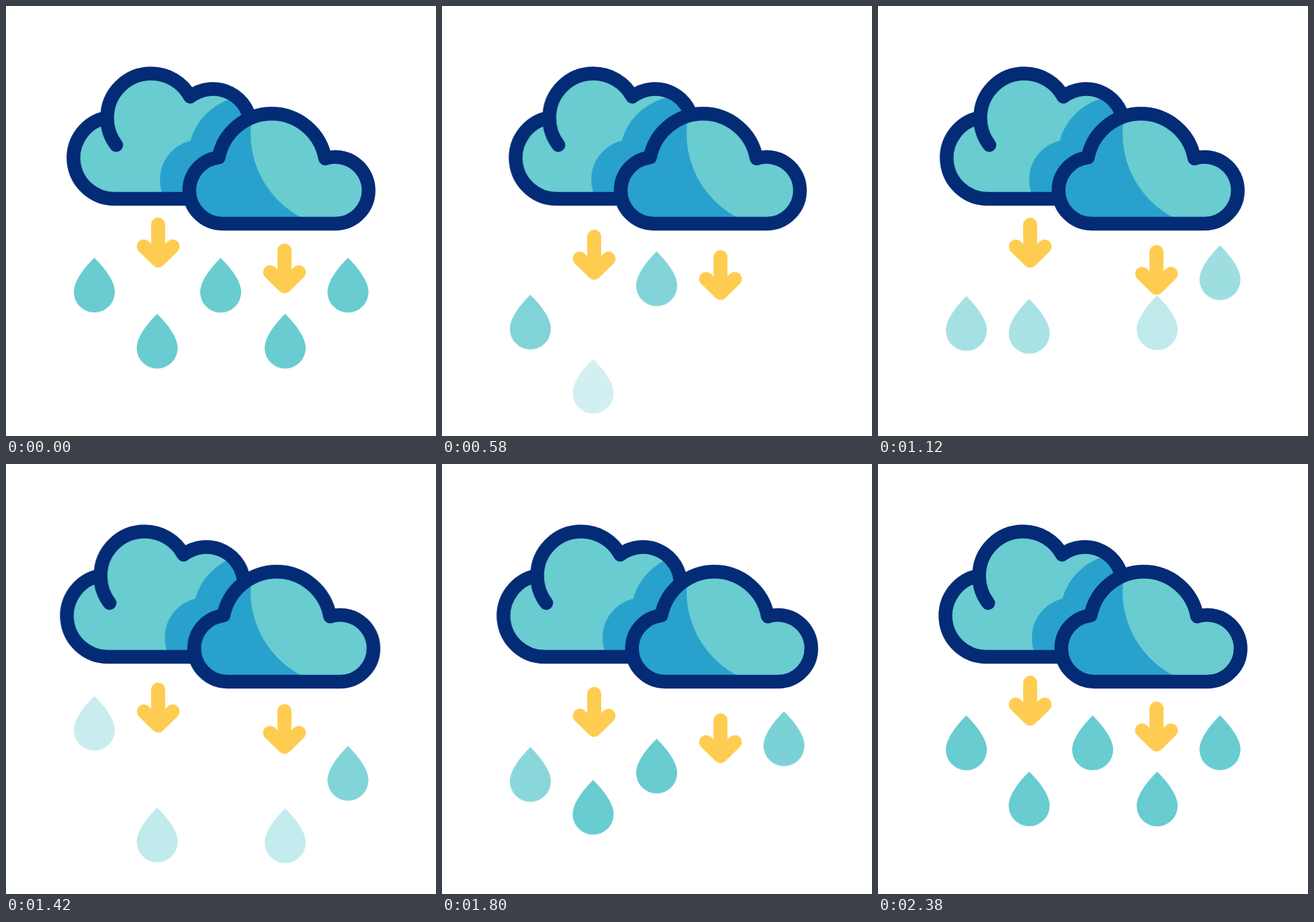
Write an HTML page that moves like this. It is 640x640 px and loops after 2400 ms.

```html
<!DOCTYPE html>
<html lang="en">
<head>
<meta charset="utf-8">
<title>Rain clouds</title>
<style>
  html, body { margin: 0; width: 100%; height: 100%; overflow: hidden; background: #fff; }
  svg { display: block; width: 100%; height: 100%; }

  .back, .unback, .front, .arrow {
    animation: 2400ms cubic-bezier(.3333, 0, .6667, 1) infinite;
  }
  .back { --k: 1px; animation-name: back; }
  .unback { --k: -1px; animation-name: back; }
  .front { animation-name: front; }
  .a1 { animation-name: bob1; }
  .a2 { animation-name: bob2; }

  @keyframes back {
    0%, 96.25%, 100% { transform: translateX(0); }
    32.5% { transform: translateX(calc(11 * var(--k))); }
    65% { transform: translateX(calc(-11.7 * var(--k))); }
  }
  @keyframes front {
    0%, 99.17%, 100% { transform: translateX(0); }
    36.25% { transform: translateX(-9.3px); }
    68.33% { transform: translateX(11.3px); }
  }
  @keyframes bob1 {
    0%, 46.25%, 100% { transform: translateY(0); }
    10% { transform: translateY(-17.8px); }
    24.6%, 70% { transform: translateY(18px); }
  }
  @keyframes bob2 {
    0%, 51.67%, 100% { transform: translateY(0); }
    13.75% { transform: translateY(-17.8px); }
    28.9%, 77.5% { transform: translateY(18px); }
  }

  .line { fill: none; stroke: #032b76; stroke-width: 20.4; stroke-linecap: round; stroke-linejoin: round; }
  .arrow { fill: none; stroke: #fecc50; stroke-width: 20.8; stroke-linecap: round; stroke-linejoin: round; }
  .teal { fill: #68ccd1; }
  .blue { fill: #28a1cd; }
  .shade { fill: #28a1cd; stroke: #28a1cd; stroke-width: 20.4; stroke-linejoin: round; }
</style>
</head>
<body>
<svg viewBox="0 0 640 640">
  <defs>
    <path id="drop" d="M0 0C-14 14-30.5 34-30.5 51A30.5 30.5 0 0 0 30.5 51C30.5 34 14 14 0 0Z"/>
    <path id="arrow" d="M226.5 325.5V378M205 358l21.5 21 21.5-21"/>
    <path id="backFill" d="M162 287A61 61 0 0 1 150.4 166A65.5 65.5 0 0 1 216 100.5A65.5 65.5 0 0 1 274 135A56 56 0 0 1 364 180.5V287Z"/>
    <path id="frontCloud" d="M322 324A49.6 49.6 0 0 1 272.8 274A49.6 49.6 0 0 1 316.5 225.3A81 81 0 0 1 395.5 160.2A81 81 0 0 1 475 227A49.7 49.7 0 0 1 539.7 274A49.7 49.7 0 0 1 490 324Z"/>
    <clipPath id="inBack"><use href="#backFill"/></clipPath>
    <clipPath id="light"><circle cx="505" cy="190" r="141"/></clipPath>
  </defs>

  <g id="rain" class="teal"></g>

  <g class="arrow a1"><use href="#arrow"/></g>
  <g class="arrow a2"><use href="#arrow" x="188" y="38.3"/></g>

  <g class="back">
    <use href="#backFill" class="teal"/>
    <g clip-path="url(#inBack)">
      <g class="unback"><g class="front">
        <use href="#frontCloud" class="shade" x="-33.5" y="-16"/>
      </g></g>
    </g>
    <path class="line" d="M310 287H162A61 61 0 0 1 150.4 166M164 207A65.5 65.5 0 0 1 150.5 166A65.5 65.5 0 0 1 216 100.5A65.5 65.5 0 0 1 274 135A56 56 0 0 1 364 180.5"/>
  </g>

  <g class="front"><use href="#frontCloud" class="blue"/></g>
  <g clip-path="url(#light)">
    <g class="front"><use href="#frontCloud" class="teal"/></g>
  </g>
  <g class="front"><use href="#frontCloud" class="line"/></g>
</svg>

<script>
  const LOOP = 2400, TOP = -40;
  const SMOOTH = 'cubic-bezier(.3333, 0, .6667, 1)';

  // falls: [start ms, end ms, end offset]; the last start is the fall back to rest
  const drops = [
    { x: 131.5, y: 374.5, falls: [[0, 770, 65], [779, 1199, 67], [1287, 1953, 60]], last: 1960 },
    { x: 225, y: 458, falls: [[0, 660, 70], [981, 1496, 59], [1540, 2040, 58]], last: 2050 },
    { x: 319.5, y: 374.5, falls: [[0, 340, 52], [360, 960, 60], [1500, 1950, 60]], last: 1960 },
    { x: 415.5, y: 458, falls: [[0, 560, 58], [1016, 1488, 60]], last: 1900 },
    { x: 509, y: 374.5, falls: [[0, 520, 70], [923, 1581, 60], [1620, 2085, 60]], last: 2090 }
  ];

  const svg = (name, parent, attrs) => {
    const el = document.createElementNS('http://www.w3.org/2000/svg', name);
    for (const key in attrs) el.setAttribute(key, attrs[key]);
    return parent.appendChild(el);
  };

  const rain = document.getElementById('rain');

  for (const { x, y, falls, last } of drops) {
    const move = [], fade = [];
    const moveKey = (ms, dy) =>
      move.push({ offset: ms / LOOP, transform: `translate(0px, ${dy}px)`, easing: SMOOTH });
    const fadeKey = (ms, opacity) =>
      fade.push({ offset: ms / LOOP, opacity, easing: SMOOTH });

    for (const [start, end, to] of falls) {
      const span = end - start;
      moveKey(start, start ? TOP : 0);
      moveKey(end, to);
      fadeKey(start, start ? 0 : 1);
      fadeKey(start + span * .5, 1);
      fadeKey(end - span * .33, 1);
      fadeKey(end, 0);
    }
    moveKey(last, TOP);
    moveKey(LOOP, 0);
    fadeKey(last, 0);
    fadeKey((last + LOOP) / 2, 1);
    fadeKey(LOOP, 1);

    const g = svg('g', rain, {});
    svg('use', g, { href: '#drop', x, y });
    const timing = { duration: LOOP, iterations: Infinity };
    g.animate(move, timing);
    g.animate(fade, timing);
  }
</script>
</body>
</html>
```
